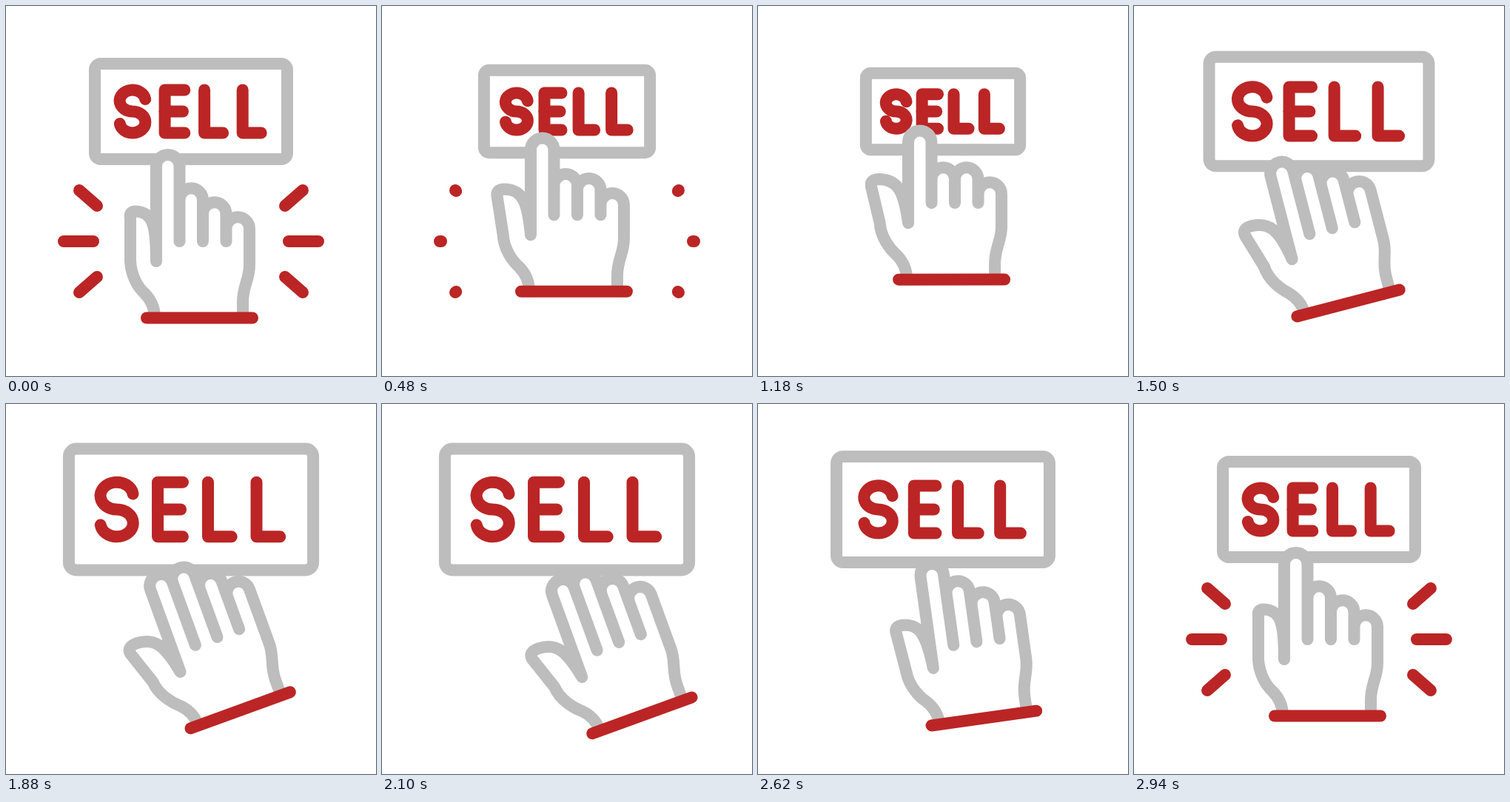
Write an HTML page with a canvas that moves like this. It is 500 px wide and 500 px high and loops after 3000 ms.

```html
<!DOCTYPE html>
<html lang="en">
<head>
<meta charset="utf-8">
<title>Sell button</title>
<style>
  html, body { margin: 0; width: 100%; height: 100%; overflow: hidden; background: #fff; }
  canvas { display: block; width: 100vmin; height: 100vmin; }
</style>
</head>
<body>
<canvas id="stage" width="500" height="500"></canvas>
<script>
const canvas = document.getElementById('stage');
const ctx = canvas.getContext('2d');
const LOOP = 3000, STEP = 20;
const GRAY = '#bdbdbd', RED = '#bb2525';

const lerp = (a, b, p) => a + (b - a) * p;

function ease(t, from, to) {
  const p = Math.min(1, Math.max(0, (t - from) / (to - from)));
  return p * p * (3 - 2 * p);
}

// open: how far the thumb spreads; tips: height of each fingertip, index first.
const POINT = { open: 0, tips: [216.8, 262, 281, 301] };
const PRESS = { open: 0.75, tips: [236, 286, 286, 306] };
const SPREAD = { open: 1, tips: [227, 228.5, 249, 272] };

// Sign scale, wrist centre, hand angle; bow arches the way to the next key upwards.
const WRIST = { x: 261.5, y: 421.5 };
const KEYS = [
  { t: 160, scale: 1, x: WRIST.x, y: WRIST.y, turn: 0, bow: 0, pose: POINT },
  { t: 670, scale: 0.8, x: 258.5, y: 369.5, turn: 0, bow: 0, pose: PRESS },
  { t: 918, scale: 0.89, x: 260, y: 369.5, turn: 0, bow: 0, pose: PRESS },
  { t: 1165, scale: 0.8, x: 261.5, y: 369.5, turn: 0, bow: 0, pose: PRESS },
  { t: 1675, scale: 1.27, x: 300, y: 413.5, turn: -20, bow: 5, pose: SPREAD },
  { t: 2330, scale: 1.27, x: 371.7, y: 429.2, turn: -20, bow: 0, pose: SPREAD },
];
KEYS.push({ ...KEYS[0], t: 2840 });

function stateAt(t) {
  const i = Math.max(1, KEYS.findIndex(k => k.t > t));
  const [a, b] = t < KEYS.at(-1).t ? [KEYS[i - 1], KEYS[i]] : KEYS.slice(-2);
  const p = ease(t, a.t, b.t);
  const mix = name => lerp(a[name], b[name], p);
  return {
    scale: mix('scale'),
    x: mix('x'),
    y: mix('y') - a.bow * Math.sin(Math.PI * p),
    turn: mix('turn') * Math.PI / 180,
    open: lerp(a.pose.open, b.pose.open, p),
    tips: a.pose.tips.map((v, n) => lerp(v, b.pose.tips[n], p)),
  };
}

function polyline(...pts) {
  ctx.beginPath();
  for (let i = 0; i < pts.length; i += 2) ctx.lineTo(pts[i], pts[i + 1]);
  ctx.stroke();
}

// Positions grow with s while the line weight stays the same.
function drawSign(s) {
  ctx.save();
  ctx.translate(250, 142.5);
  ctx.strokeStyle = GRAY;
  ctx.beginPath();
  ctx.roundRect(-130 * s, -64.5 * s, 260 * s, 129 * s, 8 * s);
  ctx.stroke();

  ctx.strokeStyle = RED;
  const line = (...pts) => polyline(...pts.map(v => v * s));
  const h = 29, lobe = h / 2, tilt = 0.14, quarter = Math.PI / 2;
  // S
  ctx.beginPath();
  ctx.ellipse(-79 * s, -lobe * s, 17.4 * s, lobe * s, 0, -tilt, quarter, true);
  ctx.ellipse(-79 * s, lobe * s, 17.4 * s, lobe * s, 0, -quarter, 2 * quarter - tilt);
  ctx.stroke();
  // E
  line(-8.7, -h, -35.4, -h, -35.4, h, -8.7, h);
  line(-35.4, 0, -11, 0);
  // LL
  for (const x of [18.1, 69.7]) line(x, -h, x, h, x + 25, h);
  ctx.restore();
}

function handPath(open, tips) {
  const side = 168 - 4.5 * open;
  const tip = { x: 168 - 20 * open, y: 287 + 12 * open };
  const crest = { x: 175 - 14 * open, y: 277.5 + 11 * open };
  const left = 203, r = 15.75, root = 318;

  ctx.beginPath();
  ctx.moveTo(201, 421);
  ctx.bezierCurveTo(201, 408, 196, 397, 187, 388);
  ctx.bezierCurveTo(178, 380, side + 1, 364, side, 345);
  // thumb
  ctx.lineTo(tip.x, tip.y);
  ctx.quadraticCurveTo(tip.x - 2, crest.y, crest.x, crest.y);
  ctx.bezierCurveTo(crest.x + 24, crest.y + 1, left - 8 * open, 297 + 5 * open, left, 345);
  // fingers
  tips.forEach((y, n) => {
    const x = left + r * (2 * n + 1);
    ctx.arc(x, y, r, Math.PI, 0);
    if (n < tips.length - 1) ctx.lineTo(x + r, root);
  });
  ctx.lineTo(329, 350);
  ctx.bezierCurveTo(329, 370, 320, 378, 320, 400);
  ctx.lineTo(320, 421);
}

function drawHand({ x, y, turn, open, tips }) {
  ctx.save();
  ctx.translate(x, y);
  ctx.rotate(turn);
  ctx.translate(-WRIST.x, -WRIST.y);
  handPath(open, tips);
  ctx.fillStyle = '#fff';
  ctx.fill();
  ctx.strokeStyle = GRAY;
  ctx.stroke();
  ctx.strokeStyle = RED;
  polyline(WRIST.x - 71.5, WRIST.y, WRIST.x + 71.5, WRIST.y);
  ctx.restore();
}

// Rays empty from the inside out, then grow back from the inside out.
function drawRays(t) {
  const back = t > LOOP / 2;
  const start = back ? 0 : ease(t, 160, 530);
  const end = back ? ease(t, 2630, 2950) : 1;
  if (end - start < 0.001) return;
  ctx.strokeStyle = RED;
  for (const side of [-1, 1]) {
    for (const row of [-1, 0, 1]) {
      const skew = Math.abs(row);
      const px = p => 250 + side * lerp(132 - 5 * skew, 172 - 21 * skew, p);
      const py = p => 318 + row * lerp(48, 69, p);
      polyline(px(start), py(start), px(end), py(end));
    }
  }
}

function draw(t) {
  ctx.fillStyle = '#fff';
  ctx.fillRect(0, 0, 500, 500);
  ctx.lineWidth = 16;
  ctx.lineCap = ctx.lineJoin = 'round';
  const state = stateAt(t);
  drawSign(state.scale);
  drawRays(t);
  drawHand(state);
}

const begin = performance.now();
function tick() {
  const t = (performance.now() - begin) % LOOP;
  draw(Math.floor(t / STEP) * STEP);
  requestAnimationFrame(tick);
}
tick();
</script>
</body>
</html>
```
